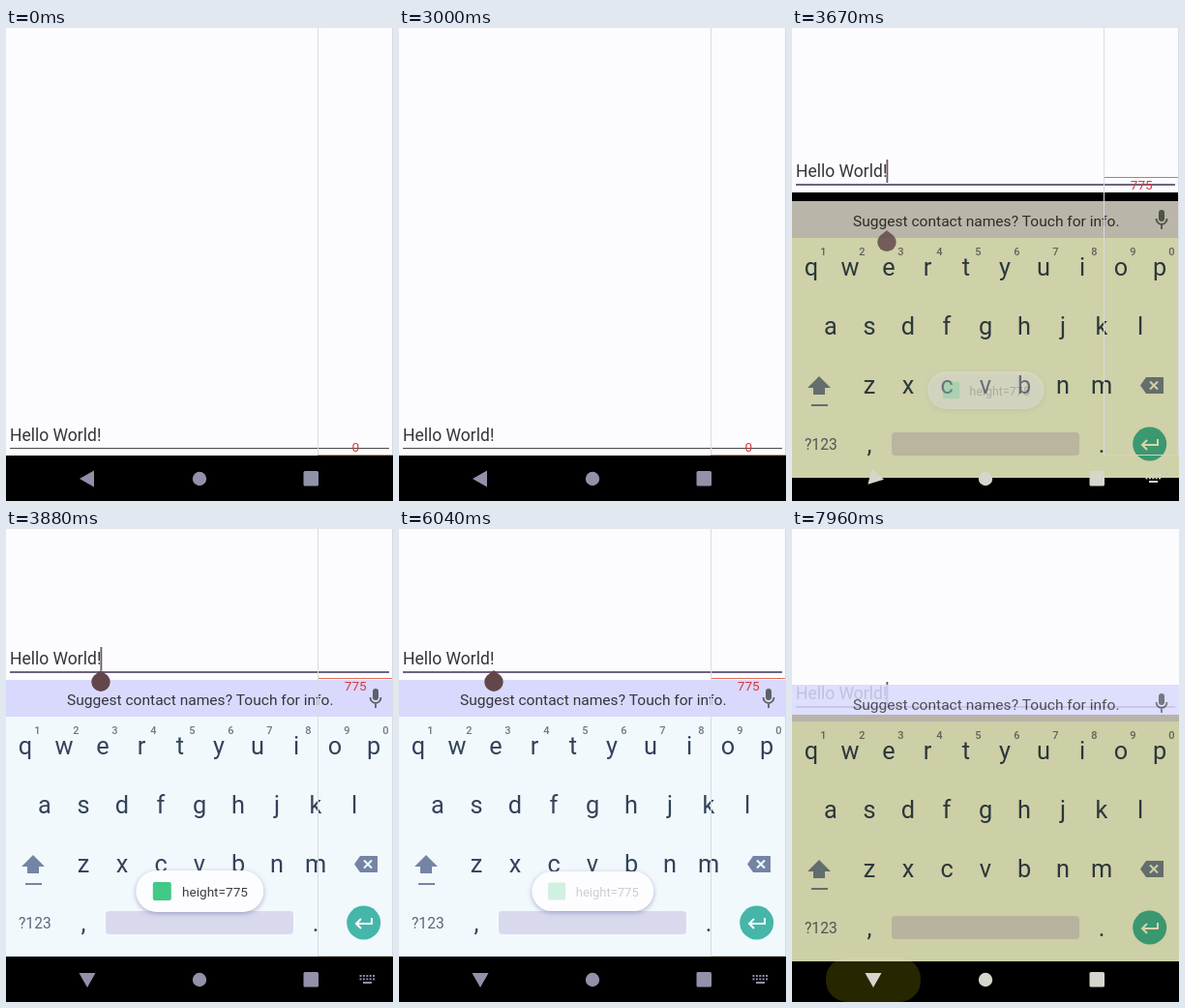
These frames come from a looping animation (400 by 489 pixels, 8000 ms). An HTML page with a canvas:

```html
<!DOCTYPE html>
<html lang="en">
<head>
<meta charset="utf-8">
<style>
html, body { margin: 0; width: 100%; height: 100%; overflow: hidden; background: #000; }
canvas { display: block; }
</style>
</head>
<body>
<canvas id="stage" width="400" height="489"></canvas>
<script>
const LOOP = 8000, FLOOR = 442, KEYS_TOP = 156, KEYS_HEIGHT = 286, LIFT = 287;
const FOCUS = 3250, OPEN = 3459, SLIDE = 290, CLOSE = 7860;
const screen = document.getElementById('stage').getContext('2d');
let ctx = screen;

const clamp = v => Math.max(0, Math.min(1, v));
const span = (t, start, length) => clamp((t - start) / length);

// Cubic bezier (.4, 0, .2, 1), solved for x by bisection.
function ease(x) {
  if (x <= 0 || x >= 1) return clamp(x);
  let low = 0, high = 1;
  for (let i = 0; i < 18; i++) {
    const u = (low + high) / 2;
    const at = 1.2 * u * (1 - u) ** 2 + 0.6 * u * u * (1 - u) + u ** 3;
    if (at < x) low = u; else high = u;
  }
  return low * low * (3 - 2 * low);
}

function rect(x, y, w, h, color, radius = 0) {
  ctx.fillStyle = color;
  ctx.beginPath();
  ctx.roundRect(x, y, w, h, radius);
  ctx.fill();
}

function circle(x, y, r, color) {
  ctx.fillStyle = color;
  ctx.beginPath();
  ctx.arc(x, y, r, 0, Math.PI * 2);
  ctx.fill();
}

function shape(path, color) {
  ctx.fillStyle = color;
  ctx.fill(new Path2D(path));
}

function stroke(path, color, width = 2) {
  ctx.strokeStyle = color;
  ctx.lineWidth = width;
  ctx.stroke(new Path2D(path));
}

function text(string, x, baseline, size, color, align = 'left', weight = 400) {
  ctx.font = `${weight} ${size}px Roboto, sans-serif`;
  ctx.textAlign = align;
  ctx.fillStyle = color;
  ctx.fillText(string, x, baseline);
}

function buildKeyboard() {
  const layer = document.createElement('canvas');
  layer.width = 400;
  layer.height = KEYS_HEIGHT;
  ctx = layer.getContext('2d');
  ctx.translate(0, -KEYS_TOP);
  const ink = '#34435a', icon = '#7484a4';

  rect(0, KEYS_TOP, 400, KEYS_HEIGHT, '#f2f9fd');
  rect(0, KEYS_TOP, 400, 38, '#d9d9fd');
  text('Suggest contact names? Touch for info.', 63, 182, 15.55, '#35353d');
  rect(379, 165, 6, 12, '#5c6068', 3);
  stroke('M376.5 174 a5.5 6 0 0 0 11 0 M382 180 v5', '#5c6068', 1.8);

  [['qwertyuiop', 20, 233], ['asdfghjkl', 40, 294], ['zxcvbnm', 80, 355]]
    .forEach(([row, left, baseline]) => [...row].forEach((letter, i) =>
      text(letter, left + 40 * i, baseline, 25.3, ink, 'center')));
  [...'1234567890'].forEach((digit, i) =>
    text(digit, 32.5 + 40 * i, 212, 11, '#747484', 'center', 500));

  shape('M28 337 l12 12 h-6 v7 h-12 v-7 h-6 z', icon);
  rect(20, 366, 17, 2, icon);
  shape('M366 338 h18 v17 h-18 l-6 -8.5 z', icon);
  stroke('M370 342.5 l8 8 m0 -8 l-8 8', '#f2f9fd');

  text('?123', 13, 413, 15.6, '#5c687c');
  text(',', 80, 416, 25.3, ink, 'center');
  text('.', 320, 416, 25.3, ink, 'center');
  rect(103, 395, 194, 24, '#d9d9ee', 4);
  circle(369.7, 407, 17.5, '#45b6a9');
  stroke('M378 402 v6 h-16 m5 -5 l-5 5 l5 5', '#fff');
  ctx = screen;
  return layer;
}

const keyboard = buildKeyboard();

function motionAt(t) {
  if (t >= CLOSE) {
    const p = (t - CLOSE) / 100;
    return { lift: Math.round(LIFT - 35 * p * p), drop: Math.round(5 * p * p), alpha: 1 - 0.15 * p };
  }
  return {
    lift: Math.round(LIFT * ease((t - OPEN) / SLIDE)),
    drop: Math.round(KEYS_HEIGHT * (1 - ease((t - OPEN - 20) / SLIDE))),
    alpha: span(t, OPEN + 20, 225)
  };
}

function drawApp(t, lift) {
  const focused = t >= FOCUS;
  rect(0, 0, 400, FLOOR - lift + (lift ? 1 : 0), '#fcfcff');
  text('Hello World!', 4, 427 - lift, 17.5, '#35353a');
  if (focused) rect(4, 434 - lift, 392, 2, '#6c6480');
  else rect(4, 434, 392, 1, '#4c4844');
  const blinkOn = t < 3980 || (t - 480) % 1000 < 500;
  if (focused && blinkOn) rect(97.5, 409 - lift, 1.8, 24, '#6c5860');
}

function drawHandle(t) {
  if (t < FOCUS + 50 || t >= CLOSE) return;
  const y = KEYS_TOP + 2 + LIFT * (1 - ease((t - OPEN - 66) / SLIDE));
  ctx.globalAlpha = 0.6 + 0.4 * span(t, 3580, 150);
  shape(`M98 ${y - 12} L105 ${y - 6.5} A9.7 9.7 0 1 1 91 ${y - 6.5} Z`, '#63464a');
  ctx.globalAlpha = 1;
}

function drawMeter(t) {
  if (t >= CLOSE) return;
  const height = t < OPEN ? 0 : 775;
  const edge = '#dadae2';
  rect(322, 0, 1, FLOOR, edge);
  rect(399, 0, 1, FLOOR, edge);
  rect(322, 441, 78, 1, height ? '#d4d4c0' : '#b89c80');
  if (height) rect(323, 154, 76, 1, '#e46c58');
  text(height, 361.3, height ? 167 : 438, 13.6, '#d8383c', 'center');
}

function drawToast(t) {
  if (t < 3640 || t >= 6200) return;
  const leaving = span(t, 5960, 160);
  const scale = 0.9 + 0.1 * ease(span(t, 3640, 160)) - 0.09 * leaving;
  const alpha = span(t, 3640, 120) * (1 - span(t, 6060, 140));
  ctx.save();
  ctx.translate(200.3, 374.5);
  ctx.scale(scale, scale);
  ctx.globalAlpha = alpha;
  ctx.shadowColor = '#6868a080';
  ctx.shadowBlur = 5;
  ctx.shadowOffsetY = 1.5;
  rect(-66, -21.5, 132, 43, '#fdfdff', 21.5);
  ctx.shadowColor = 'transparent';
  ctx.globalAlpha = alpha * (1 - span(t, 5980, 80));
  rect(-48.5, -9.5, 19, 19, '#42c986', 2);
  text('height=775', -18.3, 5.5, 13.6, '#3c3c44');
  ctx.restore();
}

function drawNavigation(t) {
  const bright = (t >= OPEN && t < 3720) || t >= CLOSE;
  const color = bright ? '#d6d6cc' : '#9191aa';
  ctx.save();
  ctx.translate(84, 466);
  ctx.rotate(-Math.PI / 2 * ease(span(t, 3600, 200)));
  shape('M-8 0 L7 -8.5 V8.5 Z', color);
  ctx.restore();
  circle(200, 466, 7.2, color);
  rect(307.5, 458, 15.5, 15.5, color, 1.5);
  if (t >= OPEN && t < CLOSE) {
    for (let row = 0; row < 2; row++)
      for (let col = 0; col < 5; col++)
        rect(365.5 + col * 3.4, 461 + row * 3.4, 2, 2, color);
    rect(369, 468, 9, 2, color);
  }
}

function draw(t) {
  const { lift, drop, alpha } = motionAt(t);
  rect(0, 0, 400, 489, '#000');
  drawApp(t, lift);

  const press = ease(span(t, 7740, 160));
  if (press) rect(84 - 49 * press, 443, 98 * press, 46, '#262600', 22);

  if (alpha > 0) {
    ctx.globalAlpha = alpha;
    ctx.drawImage(keyboard, 0, KEYS_TOP + drop);
    ctx.globalAlpha = 1;
    if (alpha < 1) {
      // The half-transparent keyboard takes a warm tint over the bare backdrop.
      ctx.globalCompositeOperation = 'multiply';
      const top = FLOOR - lift + 1;
      rect(0, top, 400, KEYS_TOP + KEYS_HEIGHT + drop - top, '#fffac6');
      ctx.globalCompositeOperation = 'source-over';
    }
  }
  drawHandle(t);
  drawMeter(t);
  drawToast(t);
  drawNavigation(t);
}

const start = performance.now();
function frame() {
  draw((performance.now() - start) % LOOP);
  requestAnimationFrame(frame);
}
frame();
</script>
</body>
</html>
```
